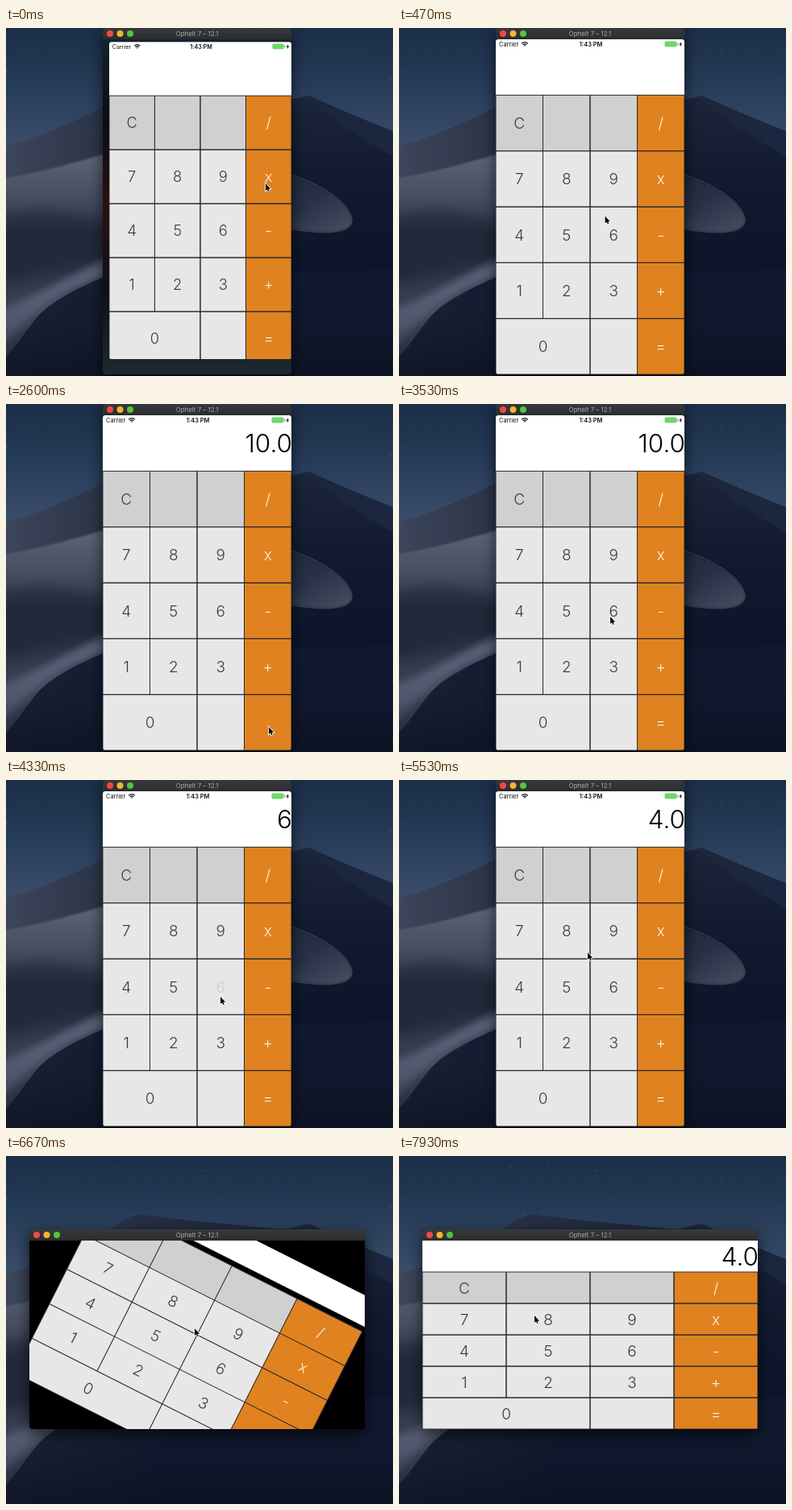
An HTML page with a canvas that plays this animation: 480 px wide and 432 px high, repeating every 8 s.

```html
<!DOCTYPE html>
<html lang="en">
<head>
<meta charset="utf-8">
<title>Calculator</title>
<style>
html, body { margin: 0; width: 100%; height: 100%; overflow: hidden; background: #10182b; }
canvas { display: block; width: 480px; height: 432px; }
</style>
</head>
<body>
<canvas id="stage" width="480" height="432"></canvas>
<script>
const stage = document.getElementById('stage');
const g = stage.getContext('2d');
const LOOP = 8000, TURN = 6465;
const CX = 237, CY = 222;
const TITLE = 'Ophelt 7 – 12.1';

const clamp = x => Math.max(0, Math.min(1, x));
const lerp = (a, b, k) => a + (b - a) * k;
const swing = k => (1 - Math.cos(Math.PI * clamp(k))) / 2;

// time, x, y of the pointer tip
const pointer = [
  [0, 322, 193], [120, 322, 193], [720, 217, 257], [930, 217, 257],
  [1400, 332, 323], [1560, 332, 323], [2000, 206, 257], [2130, 206, 257],
  [2440, 326, 401], [2670, 326, 401], [2930, 324, 195], [3110, 327, 263],
  [3260, 327, 263], [3470, 262, 264], [4130, 266, 269], [4400, 266, 269],
  [4780, 331, 402], [4950, 331, 402], [5210, 244, 265], [5500, 234, 214],
  [7230, 234, 214], [7900, 168, 198], [8000, 168, 198]
];
const presses = [[800, '5'], [1420, '+'], [2030, '5'], [2470, '='], [3140, '-'], [4200, '6'], [4830, '=']];
const HOLD = 105;
const shown = [[0, ''], [920, '5'], [2560, '10.0'], [4300, '6'], [4930, '4.0']];
const keys = [['C', '', '', '/'], ['7', '8', '9', 'x'], ['4', '5', '6', '-'], ['1', '2', '3', '+'], ['0', null, '', '=']];

function blend(c, x0, y0, x1, y1, ...colors) {
  const f = c.createLinearGradient(x0, y0, x1, y1);
  colors.forEach((v, i) => f.addColorStop(i / (colors.length - 1), v));
  return f;
}

function makeWallpaper() {
  const cv = document.createElement('canvas');
  cv.width = 480; cv.height = 432;
  const c = cv.getContext('2d');
  const shape = (d, fill, blur = 0) => {
    c.filter = blur ? `blur(${blur}px)` : 'none';
    c.fillStyle = fill;
    c.fill(new Path2D(d));
    c.filter = 'none';
  };
  c.fillStyle = blend(c, 0, 0, 0, 140, '#1a2e48', '#263b57', '#384c69');
  c.fillRect(0, 0, 480, 432);
  let seed = 11;
  const rnd = () => (seed = seed * 16807 % 2147483647) / 2147483647;
  for (let i = 0; i < 34; i++) {
    c.fillStyle = `rgba(200,215,235,${0.1 + rnd() * 0.35})`;
    c.fillRect(rnd() * 480, rnd() * 80, 1, 1);
  }
  // far range, with the shaded flank to the right of the peak
  shape('M0 147C40 136 90 114 122 97C138 84 150 74 168 73C200 75 215 80 250 82C290 86 330 90 345 91L376 84C400 95 440 112 480 128V432H0Z',
    blend(c, 0, 0, 480, 0, '#3c4559', '#262e42', '#1c2539', '#1b2740'));
  shape('M340 91L372 88C405 112 440 138 480 159V432H340Z',
    blend(c, 0, 90, 0, 330, '#1b2439', '#10182d', '#0c142a'));
  // near dune on the left: lit crest, hollow, bright lower sweep
  shape('M-9 187C35 182 80 168 135 153V440H-9Z',
    blend(c, 0, 165, 0, 350, '#596074', '#464d61', '#2b3246', '#2e3549', '#464d61'), 1);
  shape('M-9 236C40 222 85 226 135 250V296C85 290 45 300 -9 322Z', 'rgba(25,31,47,.5)', 8);
  shape('M-9 352C35 334 80 306 135 282V305C85 318 40 344 -9 400Z', 'rgba(128,136,158,.55)', 5);
  shape('M0 408C12 396 20 382 30 370C44 350 62 335 119 310L480 300V432H0Z',
    blend(c, 0, 0, 200, 0, '#1d2438', '#111930'));
  shape('M340 178C385 190 426 214 429 238C430 254 400 259 340 247Z',
    blend(c, 350, 180, 400, 258, '#1d2539', '#293147', '#41495d'), 1);
  c.strokeStyle = 'rgba(95,104,125,.4)';
  c.stroke(new Path2D('M340 178C385 190 426 214 429 238C430 254 400 259 340 247'));
  c.fillStyle = blend(c, 0, 300, 0, 432, 'rgba(12,18,36,0)', 'rgba(12,18,36,.25)', 'rgba(11,16,33,.7)');
  c.fillRect(0, 300, 480, 132);
  return cv;
}
const wallpaper = makeWallpaper();

function text(s, x, y, font, color, align = 'center') {
  g.font = font;
  g.fillStyle = color;
  g.textAlign = align;
  g.fillText(s, x, y);
}

function box(x, y, w, h, r, fill) {
  g.beginPath();
  g.roundRect(x, y, w, h, r);
  g.fillStyle = fill;
  g.fill();
}

function drawWindow(x, y, w, h) {
  g.save();
  g.shadowColor = 'rgba(0,0,0,.65)';
  g.shadowBlur = 18;
  g.shadowOffsetY = 6;
  box(x, y, w, h, 4, '#000');
  g.restore();
  box(x, y, w, 14, [4, 4, 0, 0], blend(g, 0, y, 0, y + 14, '#38393c', '#2b2c2f'));
  ['#f0484b', '#f5b52e', '#4fc63c'].forEach((c, i) => box(x + 5 + i * 12.5, y + 3, 8, 8, 4, c));
  text(TITLE, CX, y + 10, '7.9px Inter, sans-serif', '#adadaf');
}

// Coordinates are relative to the middle of the upright screen.
function drawStatus() {
  text('Carrier', -113, -199, '7.4px Inter, sans-serif', '#111', 'left');
  text('1:43 PM', 1, -199, '600 7.4px Inter, sans-serif', '#111');
  g.strokeStyle = '#111';
  g.lineWidth = 1.3;
  [1, 3.2, 5.4].forEach(r => {
    g.beginPath();
    g.arc(-81, -199, r, -Math.PI * 0.75, -Math.PI * 0.25);
    g.stroke();
  });
  box(92.5, -205.5, 15, 7, 1.8, '#8fbf8f');
  box(93.5, -204.5, 13, 5, 1, '#62e35c');
  box(108, -203.4, 1.2, 2.8, 0.5, '#87a987');
  g.fillStyle = '#111';
  g.fill(new Path2D('M113 -205L110.3 -201.3H112L111.4 -198.5L114.2 -202.4H112.4Z'));
}

function keyAlpha(key, t) {
  let a = 1;
  for (const [at, k] of presses) {
    if (k !== key || t < at) continue;
    a = t < at + HOLD ? 0.1 : lerp(0.15, 1, clamp((t - at - HOLD - 50) / 300));
  }
  return a;
}

function drawApp(w, h, t, turn) {
  const cw = w / 4, rh = h / 6, left = -w / 2, top = -h / 2;
  const inset = 8 * Math.sin(Math.PI * turn);
  g.fillStyle = '#fff';
  g.fillRect(left, top + inset, w, rh - 2 * inset);
  if (turn === 0) drawStatus();
  if (turn === 0 || turn > 0.93) {
    const value = shown.filter(s => s[0] <= t).pop()[1];
    text(value, w / 2 + 1, top + rh / 2 + 11.5, '300 31.5px Inter, sans-serif', '#000', 'right');
  }
  const edges = new Path2D();
  keys.forEach((row, r) => row.forEach((key, c) => {
    if (key === null) return;
    const x = left + c * cw, y = top + (r + 1) * rh, span = key === '0' ? cw * 2 : cw;
    g.fillStyle = c === 3 ? '#e0821f' : r === 0 ? '#d0d0d0' : '#e7e7e7';
    g.fillRect(x, y, span, rh);
    edges.rect(x, y, span, rh);
    g.globalAlpha = keyAlpha(key, t);
    text(key, x + span / 2, y + rh / 2 + 7, '300 19px Inter, sans-serif', c === 3 ? '#fff3e2' : '#3c3c3c');
    g.globalAlpha = 1;
  }));
  g.strokeStyle = '#2a2a2a';
  g.lineWidth = 1;
  g.stroke(edges);
}

function drawUpright(t) {
  drawWindow(120, 0, 234, 430);
  const k = 1 - (1 - clamp((t - 50) / 300)) ** 3;
  g.save();
  g.beginPath();
  g.roundRect(120, 14, 234, 416, [0, 0, 3, 3]);
  g.clip();
  if (k < 1) {
    g.fillStyle = blend(g, 0, 14, 0, 430, '#15222f', '#0b0d13', '#2b1013', '#0f1118', '#1b2930');
    g.fillRect(120, 14, 234, 416);
  }
  const s = lerp(0.966, 1, k);
  g.beginPath();
  g.roundRect(lerp(128, 120, k), lerp(17.2, 14, k), 234 * s, lerp(393.8, 416, k), 3);
  g.clip();
  g.translate(354, 106);
  g.scale(s, s);
  g.translate(CX - 354, CY - 106);
  drawApp(234, 416, t, 0);
  g.restore();
}

function drawSideways(t) {
  const p = swing((t - 6440) / 365);
  drawWindow(29, 91, 416, 248);
  g.save();
  g.beginPath();
  g.roundRect(29, 105, 416, 234, [0, 0, 3, 3]);
  g.clip();
  g.translate(CX, CY);
  g.rotate((1 - p) * Math.PI / 2);
  drawApp(lerp(234, 416, p), lerp(416, 234, p), t, p);
  g.restore();
}

function drawPointer(t) {
  const i = Math.max(1, pointer.findIndex(q => q[0] > t));
  const [a, b] = [pointer[i - 1], pointer[i]];
  const k = swing((t - a[0]) / (b[0] - a[0]));
  g.save();
  g.translate(lerp(a[1], b[1], k), lerp(a[2], b[2], k));
  if (presses.some(([at]) => t >= at && t < at + HOLD)) {
    g.beginPath();
    g.arc(0, 0, 12.6, 0, 7);
    for (const [width, color] of [[4.4, '#fff'], [2.2, '#000']]) {
      g.lineWidth = width;
      g.strokeStyle = color;
      g.stroke();
    }
  }
  const arrow = new Path2D('M0 0V9L2 7.2L3.3 10L4.7 9.4L3.5 6.7H6.2Z');
  g.lineWidth = 1.5;
  g.strokeStyle = '#fff';
  g.stroke(arrow);
  g.fillStyle = '#000';
  g.fill(arrow);
  g.restore();
}

function draw(t) {
  g.drawImage(wallpaper, 0, 0);
  (t < TURN ? drawUpright : drawSideways)(t);
  drawPointer(t);
}

const start = performance.now();
function tick() {
  draw((performance.now() - start) % LOOP);
  requestAnimationFrame(tick);
}
tick();
</script>
</body>
</html>
```
